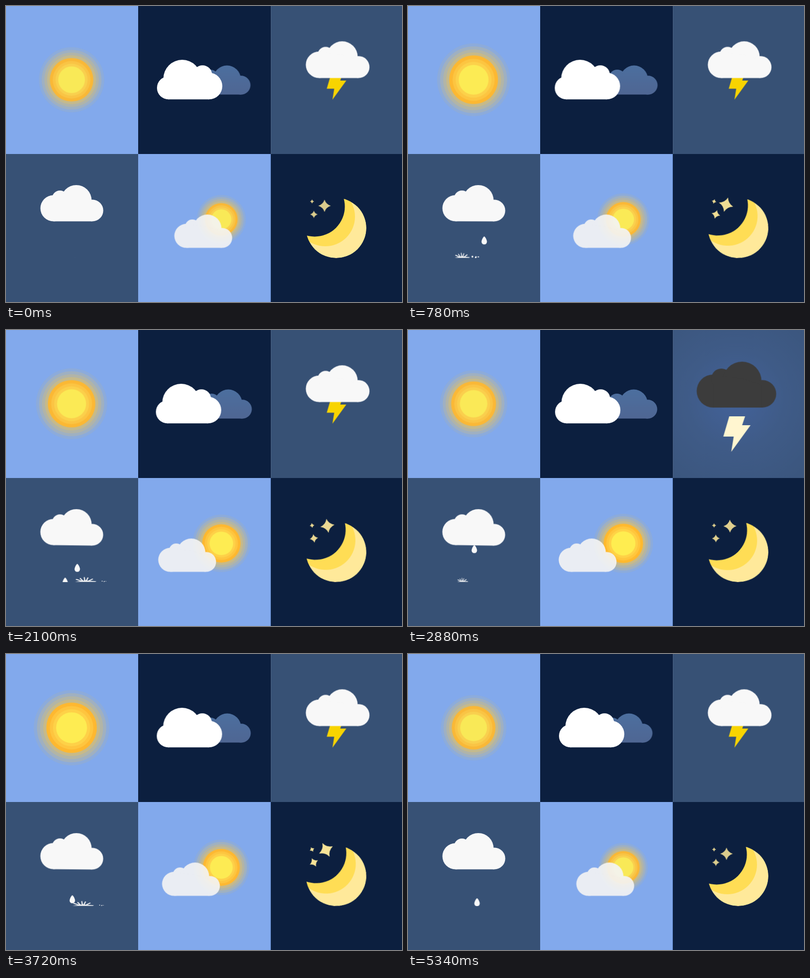
Recreate the animation shown at these times as an HTML page. Size 800 by 600 pixels, loop 5370 ms.

```html
<!DOCTYPE html>
<html lang="en">
<head>
<meta charset="utf-8">
<title>Weather</title>
<style>
html, body { margin: 0; width: 100%; height: 100%; overflow: hidden; background: #375175; }
svg { display: block; width: 800px; height: 600px; }

/* whole loop: 5370 ms; every part runs on a fraction of it */
.pulse { animation: 1342.5ms linear infinite alternate; }
.slow { animation: 2685ms linear infinite alternate; }
.drift { animation: 895ms ease-in-out infinite alternate; }
.soft { animation: 2685ms ease-in-out infinite alternate; }

.sun { animation-name: sun; }
.smallsun { animation-name: smallsun; }
.front { animation-name: front; }
.back { animation-name: back; }
.veil { animation-name: veil; }
.sway { animation-name: sway; }
.moon { animation-name: moon; }
.spin { animation-name: spin; }
.twinkle { animation-name: twinkle; }
@keyframes sun { from { transform: scale(1); opacity: .95 } to { transform: scale(1.205) } }
@keyframes smallsun { from { transform: scale(.75); opacity: .95 } to { transform: scale(.92) } }
@keyframes front { to { transform: translateX(-8.8px) } }
@keyframes back { to { transform: translateX(10.6px) } }
@keyframes veil { to { transform: translateX(-36px) } }
@keyframes sway { to { transform: rotate(.8deg) } }
@keyframes moon { to { transform: rotate(5deg) } }
@keyframes spin { to { transform: rotate(90deg) } }
@keyframes twinkle { from { transform: scale(1); opacity: .85 } to { transform: scale(1.33) } }

.storm { animation: 2685ms ease-in-out infinite; }
.thunder { animation-name: thunder; }
.bolt { animation-name: bolt; }
.glow { animation-name: glow; }
@keyframes thunder {
  0%, 1.2%, 19.5%, 100% { transform: translate(670px, 109px) scale(1.013); fill: #f8f8f8 }
  6.5%, 12% { transform: translate(663.5px, 111px) scale(1.265); fill: #3c3c3c }
}
@keyframes bolt {
  0%, 1.2%, 19.5%, 100% { transform: translate(667.7px, 164px) scale(.718); fill: #f8d400 }
  6.5%, 12% { transform: translate(664.5px, 211px) scale(1); fill: #fff6d0 }
}
@keyframes glow {
  0%, 1.2%, 19.5%, 100% { opacity: 0 }
  6.5%, 12% { opacity: 1 }
}

/* fall 0 - 400 ms, splash 400 - 760 ms */
.rain * { animation: 5370ms linear infinite; animation-delay: inherit; }
.rain .drop { animation-name: fall; }
.rain .splash { animation-name: splash; }
.rain .spray { animation-name: spray; }
.rain path, .rain line, .rain ellipse { animation: none; }
@keyframes fall {
  0% { transform: translateY(428px); animation-timing-function: cubic-bezier(.333, 0, .667, .333) }
  7.45% { transform: translateY(515px) }
  7.6%, 100% { transform: translateY(530px) }
}
@keyframes splash {
  0%, 7.45% { transform: translateY(510px) scale(0); opacity: 1 }
  9.1% { transform: translateY(510px) scale(.5, .75) }
  11.2% { transform: translateY(510px) scale(.74, 1) }
  13% { transform: translateY(510px) scale(1, .9); opacity: 1 }
  14.15% { transform: translateY(510px) scale(1.08, .1); opacity: 1 }
  14.16%, 100% { transform: translateY(510px) scale(0); opacity: 0 }
}
@keyframes spray {
  0%, 8.8% { transform: translate(5px, 510px) scale(0); opacity: 1 }
  10.8% { transform: translate(26px, 508.5px) scale(1) }
  13% { transform: translate(38px, 509.3px) scale(.6, .4) }
  14.15%, 100% { transform: translate(44px, 510px) scale(0) }
}
</style>
</head>
<body>
<svg viewBox="0 0 800 600">
  <defs>
    <g id="cloud">
      <circle cx="-37" cy="10" r="26.5"/>
      <circle cx="-24" cy="-10" r="16"/>
      <circle cx="9" cy="-6" r="31"/>
      <circle cx="41.5" cy="14.5" r="22"/>
      <path d="M-37 36.5V0L-24-14L9-10L41 0V36.5Z"/>
    </g>
    <g id="sun" fill="#ffc83c">
      <circle r="66" opacity=".09"/>
      <circle r="60.5" opacity=".17"/>
      <circle r="55" opacity=".2"/>
      <circle r="49.5" opacity=".28"/>
      <circle r="44" fill="#ffb92e"/>
      <circle r="38" fill="#ffc63d"/>
      <circle r="32.5" fill="#ffd246"/>
      <circle r="27" fill="#ffed50"/>
    </g>
    <path id="star" fill="#ffea9a" d="M0-12.5Q3-3 12.5 0Q3 3 0 12.5Q-3 3-12.5 0Q-3-3 0-12.5Z"/>
    <path id="drop" d="M0-8C2-8 5.5-1 5.5 2.5A5.5 5.5 0 0 1-5.5 2.5C-5.5-1-2-8 0-8Z"/>
    <g id="splash">
      <path d="M-1 0L-18-6L-20-4.5L-6 0ZM-2 0L-10-8.5L-11.5-7L-5 0ZM-2 0L-3-10L-1.2-10.5L1 0ZM0 0L5-9.5L6.8-8.8L3 0ZM2 0L15-7L16.5-5.5L6 0Z"/>
      <path d="M-21 .5L-12-1L0-2.5L12-1.5L23-.8L21 .5Z"/>
    </g>
    <g id="spray">
      <ellipse cx="-5" cy="-.5" rx="1.6" ry="2"/>
      <ellipse cx="2" cy="0" rx="1.6" ry="2.4" transform="rotate(25)"/>
      <ellipse cx="7" cy="0" rx="1.8" ry="1"/>
    </g>
    <radialGradient id="flash" gradientUnits="userSpaceOnUse" cx="662" cy="140" r="200">
      <stop offset="0" stop-color="#43629a"/>
      <stop offset=".5" stop-color="#3f5b87"/>
      <stop offset="1" stop-color="#3b567e"/>
    </radialGradient>
    <linearGradient id="dusk" gradientUnits="userSpaceOnUse" x1="0" y1="120" x2="0" y2="180">
      <stop offset="0" stop-color="#4c6f9f"/>
      <stop offset="1" stop-color="#4f6693"/>
    </linearGradient>
    <clipPath id="disc"><circle r="61"/></clipPath>
    <clipPath id="ground"><path d="M0 300H267V510.5H0Z"/></clipPath>
    <clipPath id="body"><use href="#cloud"/></clipPath>
    <mask id="crescent" maskUnits="userSpaceOnUse" x="-70" y="-70" width="140" height="140">
      <circle r="61" fill="#fff"/>
      <circle cx="-43.5" cy="-43.5" r="61" fill="#000"/>
    </mask>
  </defs>

  <!-- panels -->
  <path fill="#82a9ec" d="M0 0H267V300H0ZM267 300H535V600H267Z"/>
  <path fill="#0c1f3f" d="M267 0H535V300H267ZM535 300H800V600H535Z"/>
  <path fill="#375175" d="M535 0H800V300H535ZM0 300H267V600H0Z"/>
  <path class="storm glow" fill="url(#flash)" d="M535 0H800V300H535Z"/>
  <path fill="#4b6284" d="M535 0H536V300H535Z"/>
  <path fill="#6f97dc" d="M533.5 300H535V600H533.5Z"/>

  <!-- sunny -->
  <g transform="translate(132.5 149.5)"><use href="#sun" class="pulse sun"/></g>

  <!-- cloudy night -->
  <g transform="translate(-10.6 0)"><g class="drift back" fill="url(#dusk)">
    <circle cx="418" cy="157.5" r="22"/>
    <circle cx="423" cy="146" r="17"/>
    <circle cx="457" cy="148.5" r="28"/>
    <circle cx="485.3" cy="160.5" r="19.2"/>
    <path d="M418 179.6V148H457L485 160V179.6Z"/>
  </g></g>
  <g class="drift front" fill="#fff">
    <circle cx="328.3" cy="166" r="23.3"/>
    <circle cx="356" cy="147" r="38"/>
    <circle cx="397" cy="139.5" r="19.3"/>
    <circle cx="410" cy="162.3" r="27"/>
    <path d="M328 189.3V160L356 140L397 139L410 150V189.3Z"/>
  </g>

  <!-- thunder -->
  <path class="storm bolt" d="M-15.5-36H16.5L10.5-18H27.5L-11.5 36L-6.5 5H-27.5Z"/>
  <use href="#cloud" class="storm thunder"/>

  <!-- rain -->
  <g clip-path="url(#ground)" fill="#f8f8f8" id="rain"></g>
  <g transform="translate(133 400)"><use href="#cloud" class="soft sway" fill="#f8f8f8"/></g>

  <!-- partly sunny -->
  <g transform="translate(435 432.5)"><use href="#sun" class="slow smallsun"/></g>
  <g class="soft veil"><g transform="translate(398.5 456.7) scale(.92)">
    <use href="#cloud" fill="#f3f3f3" opacity=".92"/>
    <g clip-path="url(#body)">
      <use href="#cloud" fill="#fff" opacity=".75" x="-11" y="2"/>
      <path fill="#fff" opacity=".75" d="M-64 0H-58V37H-64Z"/>
    </g>
  </g></g>

  <!-- clear night -->
  <g transform="translate(667 450)"><g class="pulse moon"><g mask="url(#crescent)">
    <circle r="61" fill="#ffe99a"/>
    <circle cx="-22" cy="-23" r="60" fill="#ffdd55" clip-path="none"/>
  </g></g></g>
  <g id="stars"></g>
</svg>
<script>
// x of each drop and the time it reaches the ground
const drops = [
  [128, 400], [109, 600], [154, 886], [124, 1200], [149, 1480], [160, 1810],
  [119.5, 2112], [144, 2185], [129, 2500], [110, 2790], [134, 3108], [155, 3430],
  [134, 3764], [99, 4194], [159, 4454], [119.5, 4604], [146, 4900], [139.5, 5369]
];
const fallTime = 400, loop = 5370;
document.getElementById('rain').innerHTML = drops.map(([x, hit]) =>
  `<g class="rain" transform="translate(${x} 0)" style="animation-delay:${hit - fallTime - loop}ms">` +
  ['drop', 'splash', 'spray'].map(part => `<use href="#${part}" class="${part}"/>`).join('') +
  '</g>').join('');

// pivot x, pivot y, offset from pivot, size
const stars = [[650.6, 405, -7.1, 1], [622, 422.5, 0, .6], [618.3, 396.2, 0, .33]];
document.getElementById('stars').innerHTML = stars.map(([x, y, dx, size]) =>
  `<g transform="translate(${x} ${y})"><g class="soft spin"><g class="pulse twinkle">` +
  `<use href="#star" transform="translate(${dx} 0) scale(${size})"/></g></g></g>`).join('');
</script>
</body>
</html>
```
